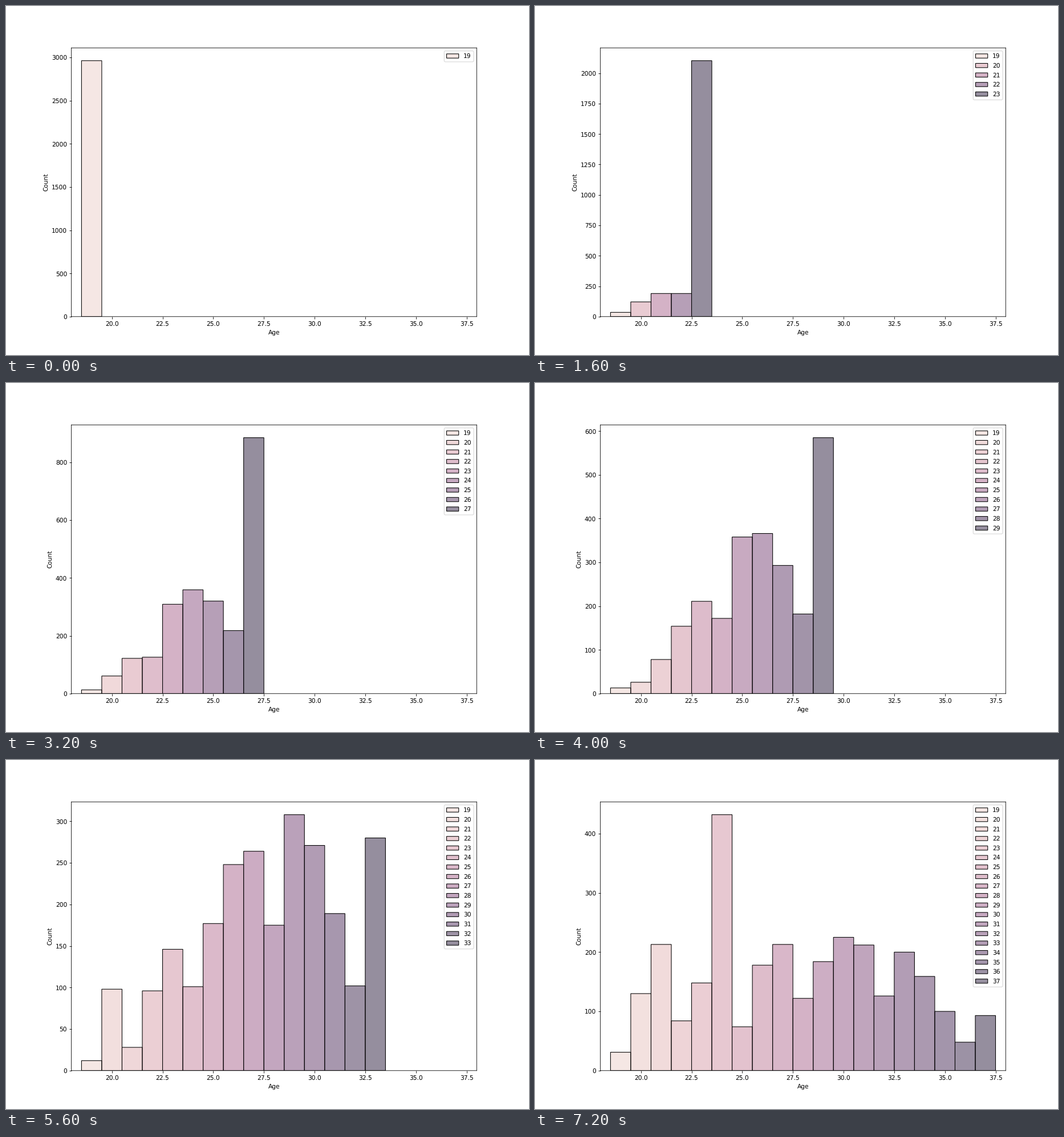
Write a matplotlib script that moves like this. It is 917 px wide and 611 px high and loops after 7.6 s.

```python
import numpy as np
import matplotlib.pyplot as plt
from matplotlib.animation import FuncAnimation

DPI = 611 / 8
FIRST_AGE = 19
STEPS = 19
STEP_MS = 400

# The founding cohort shrinks geometrically between a few key years.
KEY_YEARS = [0, 1, 4, 6, 8, 9, 12, 14, 18]
KEY_COUNTS = [2963, 2469, 2103, 1379, 885, 688, 423, 280, 93]
# Peak size of each later cohort, in order of entry.
PEAKS = [230, 320, 370, 360, 185, 265, 250, 190, 122,
         215, 190, 87, 595, 255, 200, 800, 985, 850]

# Smooth subpixel edges and unhinted text.
plt.rcParams.update({"path.snap": False, "text.hinting": "none"})


def cohort_count(entry, year):
    """Size of the cohort that turned FIRST_AGE in its entry year."""
    if entry == 0:
        return np.exp(np.interp(year, KEY_YEARS, np.log(KEY_COUNTS)))
    # Quick growth and a slow decline; later cohorts take longer to peak.
    u = (year - entry + 1) / (6 + 0.4 * entry)
    return PEAKS[entry - 1] * (u * np.exp(1 - u)) ** 2


def cubehelix(t, rot=0.4, hue=0.8, light=0.85, dark=0.15):
    """Colour at t, from light (0) to dark (1)."""
    x = light + (dark - light) * t
    amp = hue * x * (1 - x) / 2
    c, s = np.cos(2 * np.pi * rot * x), np.sin(2 * np.pi * rot * x)
    return (x + amp * (-0.14861 * c + 1.78277 * s),
            x + amp * (-0.29227 * c - 0.90649 * s),
            x + amp * 1.97294 * c)


# The tiny surplus keeps the pixel width from truncating to 916.
fig, ax = plt.subplots(figsize=(917.001 / DPI, 8), dpi=DPI)


def draw(year):
    ax.clear()
    counts = [round(cohort_count(year - i, year)) for i in range(year + 1)]
    for i, count in enumerate(counts):
        age = FIRST_AGE + i
        ax.bar(age, count, width=1, label=str(age), linewidth=1,
               edgecolor="black", facecolor=(*cubehelix(i / max(year, 1)), 0.5))
    ax.set_xlim(18, 38)
    ax.set_ylim(0, 1.05 * max(counts))
    ax.set_xlabel("Age")
    ax.set_ylabel("Count")
    ax.legend(loc="upper right", labelspacing=0.566)
    return []


anim = FuncAnimation(fig, draw, frames=STEPS, interval=STEP_MS,
                     init_func=lambda: draw(0), repeat=True, repeat_delay=0)
plt.show()
```
